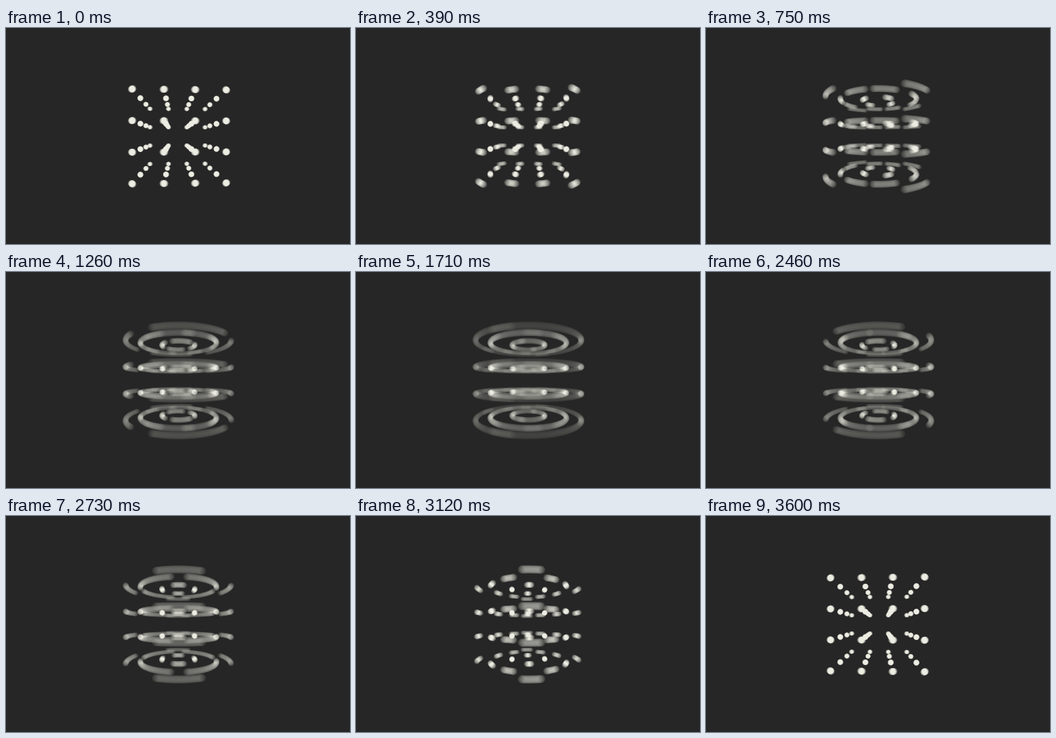
An HTML page with a canvas that plays this animation: 440 by 277 pixels, repeating every 3.63 s.

```html
<!DOCTYPE html>
<html lang="en">
<head>
<meta charset="utf-8">
<title>Spinning lattice</title>
<style>
  html, body { margin: 0; width: 100%; height: 100%; overflow: hidden; background: #262626; }
  canvas { display: block; width: 440px; height: 277px; }
</style>
</head>
<body>
<canvas id="stage" width="440" height="277"></canvas>
<script>
const FRAMES = 121, STEP = 30;
const CX = 220.5, CY = 139;             // middle of the lattice on the stage
const FOCAL = 169.8, EYE = 5.73;        // perspective, in lattice units
const DOT = 0.108;                      // dot radius, in lattice units
const STEADY = 360, EASED = 16 * 360;   // degrees per loop: even part and eased part
const POWER = 2.726;
const SHUTTER = 0.9;                    // open part of a frame, centred
const GAMMA = 2;
const BACK = [38, 38, 38], INK = [236, 236, 226];

// Drawn area around the lattice
const X0 = 140, Y0 = 54, W = 162, H = 170;
const ctx = document.getElementById('stage').getContext('2d');
const img = ctx.createImageData(W, H);
const light = new Float32Array(W * H);

// Blended in linear light: one colour ramp from background to dot
const toLinear = v => Math.pow(v / 255, GAMMA);
const LEVELS = 1023;
const ramp = BACK.map((b, i) => {
  const lo = toLinear(b), hi = toLinear(INK[i]);
  return Array.from({ length: LEVELS + 1 }, (_, k) =>
    255 * Math.pow(lo + (hi - lo) * k / LEVELS, 1 / GAMMA));
});

const axis = [-1.5, -0.5, 0.5, 1.5];
const columns = axis.flatMap(x => axis.map(z => ({ x, z })));

function ease(u) {
  return u < 0.5 ? Math.pow(2 * u, POWER) / 2 : 1 - Math.pow(2 - 2 * u, POWER) / 2;
}

// Degrees turned at a frame position: slow, very fast, slow again
function turn(frame) {
  const u = frame / FRAMES;
  return STEADY * u + EASED * ease(u);
}

function addDot(x, y, r, weight) {
  const reach = r + 0.5;
  const left = Math.max(0, Math.floor(x - reach)), right = Math.min(W - 1, Math.ceil(x + reach));
  const top = Math.max(0, Math.floor(y - reach)), bottom = Math.min(H - 1, Math.ceil(y + reach));
  for (let j = top; j <= bottom; j++) {
    for (let i = left; i <= right; i++) {
      const cover = reach - Math.hypot(i + 0.5 - x, j + 0.5 - y);
      if (cover > 0) light[j * W + i] += weight * Math.min(1, cover);
    }
  }
}

function addLattice(deg, weight) {
  const a = deg * Math.PI / 180, c = Math.cos(a), s = Math.sin(a);
  for (const p of columns) {
    const scale = FOCAL / (EYE - (p.z * c - p.x * s));
    const x = CX - X0 + (p.x * c + p.z * s) * scale;
    for (const y of axis) addDot(x, CY - Y0 + y * scale, DOT * scale, weight);
  }
}

function draw(frame) {
  light.fill(0);
  const open = frame + (1 - SHUTTER) / 2;
  const sweep = turn(open + SHUTTER) - turn(open);
  const samples = 8 + Math.ceil(sweep / 2);
  for (let k = 0; k < samples; k++) {
    addLattice(turn(open + SHUTTER * (k + 0.5) / samples), 1 / samples);
  }
  for (let i = 0; i < light.length; i++) {
    const level = Math.round(Math.min(1, light[i]) * LEVELS);
    for (let ch = 0; ch < 3; ch++) img.data[i * 4 + ch] = ramp[ch][level];
    img.data[i * 4 + 3] = 255;
  }
  ctx.putImageData(img, X0, Y0);
}

ctx.fillStyle = `rgb(${BACK})`;
ctx.fillRect(0, 0, 440, 277);

let start = null, shown = -1;
function tick(now) {
  if (start === null) start = now;
  const frame = Math.floor(Math.max(0, now - start) / STEP) % FRAMES;
  if (frame !== shown) draw(shown = frame);
  requestAnimationFrame(tick);
}
requestAnimationFrame(tick);
</script>
</body>
</html>
```
